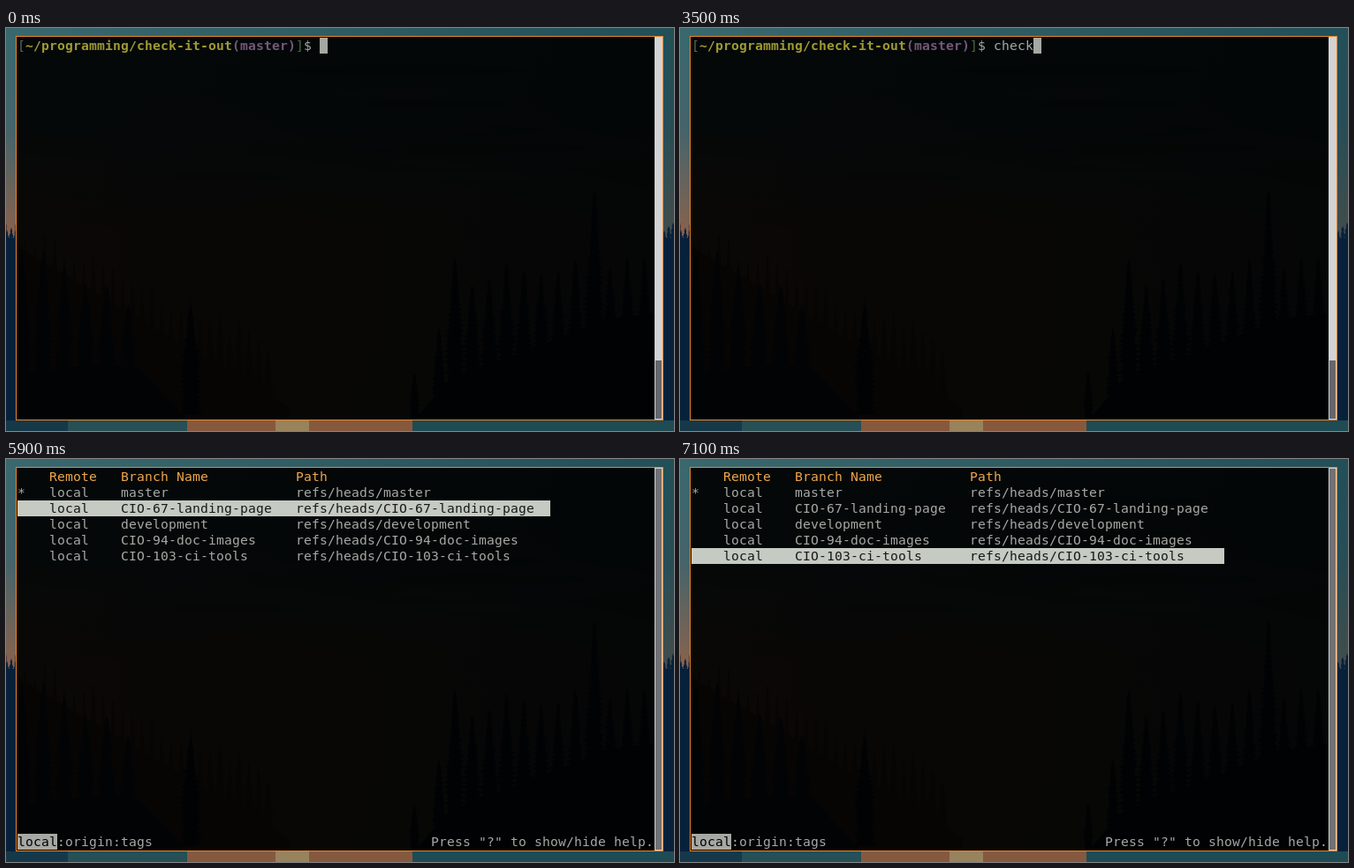
These frames come from a looping animation (756 by 457 pixels, 8 s). An HTML page with a canvas:

```html
<!DOCTYPE html>
<html lang="en">
<head>
<meta charset="utf-8">
<title>Branch picker</title>
<style>
html, body { margin: 0; width: 756px; height: 457px; overflow: hidden; background: #000; }
canvas { display: block; }
</style>
</head>
<body>
<canvas id="stage" width="756" height="457"></canvas>
<script>
const W = 756, H = 457, LOOP = 8000;
const CELL_W = 9, CELL_H = 18, LEFT = 13, TOP = 11;
const GREY = '#a6a8a4', ORANGE = '#eda64c', FRAME = '#e6862a', INK = '#161a1a';
const ctx = document.getElementById('stage').getContext('2d');

let seed = 7;
const random = () => (seed = seed * 16807 % 2147483647) / 2147483647;
const between = (a, b) => a + (b - a) * random();

function rect(c, color, x, y, w, h) {
  c.fillStyle = color;
  c.fillRect(x, y, w, h);
}

function shape(c, color, ...points) {
  c.fillStyle = color;
  c.beginPath();
  points.forEach(([x, y]) => c.lineTo(x, y));
  c.fill();
}

// Evenly spaced colour stops from the stage's top left towards (x, y)
function gradient(c, x, y, ...colors) {
  const g = c.createLinearGradient(0, 0, x, y);
  colors.forEach((color, i) => g.addColorStop(i / (colors.length - 1), color));
  return g;
}

// Conifer: a spire whose ragged branches widen towards the base
function tree(c, color, x, top, base, half) {
  const steps = Math.ceil((base - top) / 6), left = [], right = [];
  for (let i = 1; i <= steps; i++) {
    const y = top + (base - top) * i / steps;
    const reach = half * Math.min(1, 0.12 + 1.5 * i / steps);
    const l = reach * between(0.7, 1), r = reach * between(0.7, 1);
    left.unshift([x - l * 0.6, y], [x - l, y - 1]);
    right.push([x + r, y - 1], [x + r * 0.6, y]);
  }
  shape(c, color, [x, top], ...right, ...left);
}

function paintBackdrop() {
  const canvas = document.createElement('canvas');
  canvas.width = W;
  canvas.height = H;
  const c = canvas.getContext('2d');
  const near = '#08213a', dark = '#061a2b';

  rect(c, gradient(c, 0, H, '#38696e', '#45646a', '#85624f', '#866347', '#80623f'), 0, 0, W, H);
  rect(c, gradient(c, W, 0, 'rgba(20,62,72,0)', 'rgba(20,62,72,.6)'), 0, 0, W, H);

  for (let i = 0; i < 9; i++) {
    c.fillStyle = i % 2 ? 'rgba(130,150,110,.12)' : 'rgba(15,45,55,.2)';
    c.beginPath();
    c.ellipse(between(220, 540), between(40, 180), between(60, 190), between(3, 9), 0, 0, 7);
    c.fill();
  }

  // Hazy forest sloping down from the left
  const haze = '#54382f';
  shape(c, haze, [0, 240], [320, 430], [320, H], [0, H]);
  for (let x = 0; x < 300; x += 11) tree(c, haze, x, 210 + x * 0.45 + between(0, 25), 440, 8);

  // Near slopes and their trees
  shape(c, near, [0, 395], [110, 380], [150, 386], [207, 446], [0, 446]);
  for (let x = 18; x < 160; x += 24) tree(c, near, x, 222 + x * 0.5 + between(0, 25), 410, 12);
  tree(c, dark, 209, 315, 438, 14);

  shape(c, dark, [452, H], [500, 400], [680, 330], [W, 320], [W, H]);
  for (let x = 508; x < 740; x += 19.5) tree(c, dark, x, between(248, 295), 440, 13);
  tree(c, dark, 462, 390, 446, 7);
  tree(c, dark, 490, 340, 446, 10);
  tree(c, dark, 666, 184, 446, 15);

  // Margins around the window
  for (const x of [0, 744]) {
    rect(c, near, x, 238, 12, 219);
    for (let i = 0; i < 3; i++) tree(c, near, x + 1 + i * 5, between(218, 230), 260, 5);
  }
  rect(c, '#16394a', 0, 445, 70, 12);
  rect(c, '#264f56', 70, 445, 135, 12);
  rect(c, '#86593f', 205, 445, 255, 12);
  rect(c, '#98835c', 305, 445, 38, 12);
  rect(c, '#1f4b54', 460, 445, 296, 12);

  // Translucent window and its frame
  rect(c, 'rgba(0,0,0,.92)', 12, 10, 722, 434);
  c.strokeStyle = FRAME;
  c.strokeRect(11.5, 9.5, 732, 435);
  return canvas;
}

const backdrop = paintBackdrop();

function text(str, col, row, color, bold) {
  ctx.font = (bold ? 'bold ' : '') + '14.67px "DejaVu Sans Mono", monospace';
  ctx.fillStyle = color;
  [...str].forEach((ch, i) => ctx.fillText(ch, LEFT + (col + i) * CELL_W, TOP + row * CELL_H + 14));
}

function block(col, row, cols, color) {
  rect(ctx, color, LEFT + col * CELL_W, TOP + row * CELL_H, cols * CELL_W, CELL_H);
}

function scrollbar(top, thumb) {
  rect(ctx, '#d2d3d6', 734, 10, 9, 434);
  rect(ctx, thumb, 735, top, 7, 443 - top);
}

const passed = (times, t) => times.filter(at => t >= at).length;

const COMMAND = 'checkit', KEYS = [900, 1400, 1800, 2100, 3500, 3800, 4200];
const ENTER = 4800, OPEN = 5000, FIRST_MOVE = 5900, MOVE_GAP = 400;
const BRANCHES = ['master', 'CIO-67-landing-page', 'development', 'CIO-94-doc-images', 'CIO-103-ci-tools'];

function drawShell(t) {
  scrollbar(377, '#66676d');
  text('[', 0, 0, '#626660');
  text('~/programming/check-it-out', 1, 0, '#a09a32', true);
  text('(master)', 27, 0, '#75587a', true);
  text(']', 35, 0, '#4f6845');
  text('$', 36, 0, GREY);
  const typed = passed(KEYS, t);
  text(COMMAND.slice(0, typed), 38, 0, GREY);
  if (t >= ENTER) block(0, 1, 1, GREY);
  else if (t < 500 || t >= 800) block(38 + typed, 0, 1, GREY);
}

function drawPicker(t) {
  scrollbar(11, '#707276');
  text('Remote', 4, 0, ORANGE);
  text('Branch Name', 13, 0, ORANGE);
  text('Path', 35, 0, ORANGE);
  const moves = Math.floor((t - FIRST_MOVE) / MOVE_GAP) + 1;
  const selected = Math.min(BRANCHES.length - 1, Math.max(0, moves));
  BRANCHES.forEach((name, i) => {
    const row = i + 1, color = i === selected ? INK : GREY;
    if (i === selected) block(0, row, 67, '#c5cac2');
    if (i === 0) text('*', 0, row, color);
    text('local', 4, row, color);
    text(name, 13, row, color);
    text('refs/heads/' + name, 35, row, color);
  });
  block(0, 23, 5, GREY);
  text('local', 0, 23, '#000');
  text(':origin:tags', 5, 23, GREY);
  text('Press "?" to show/hide help.', 52, 23, GREY);
}

const start = performance.now();
function frame(now) {
  const t = Math.max(0, now - start) % LOOP;
  ctx.drawImage(backdrop, 0, 0);
  if (t < OPEN) drawShell(t);
  else drawPicker(t);
  requestAnimationFrame(frame);
}
frame(start);
</script>
</body>
</html>
```
